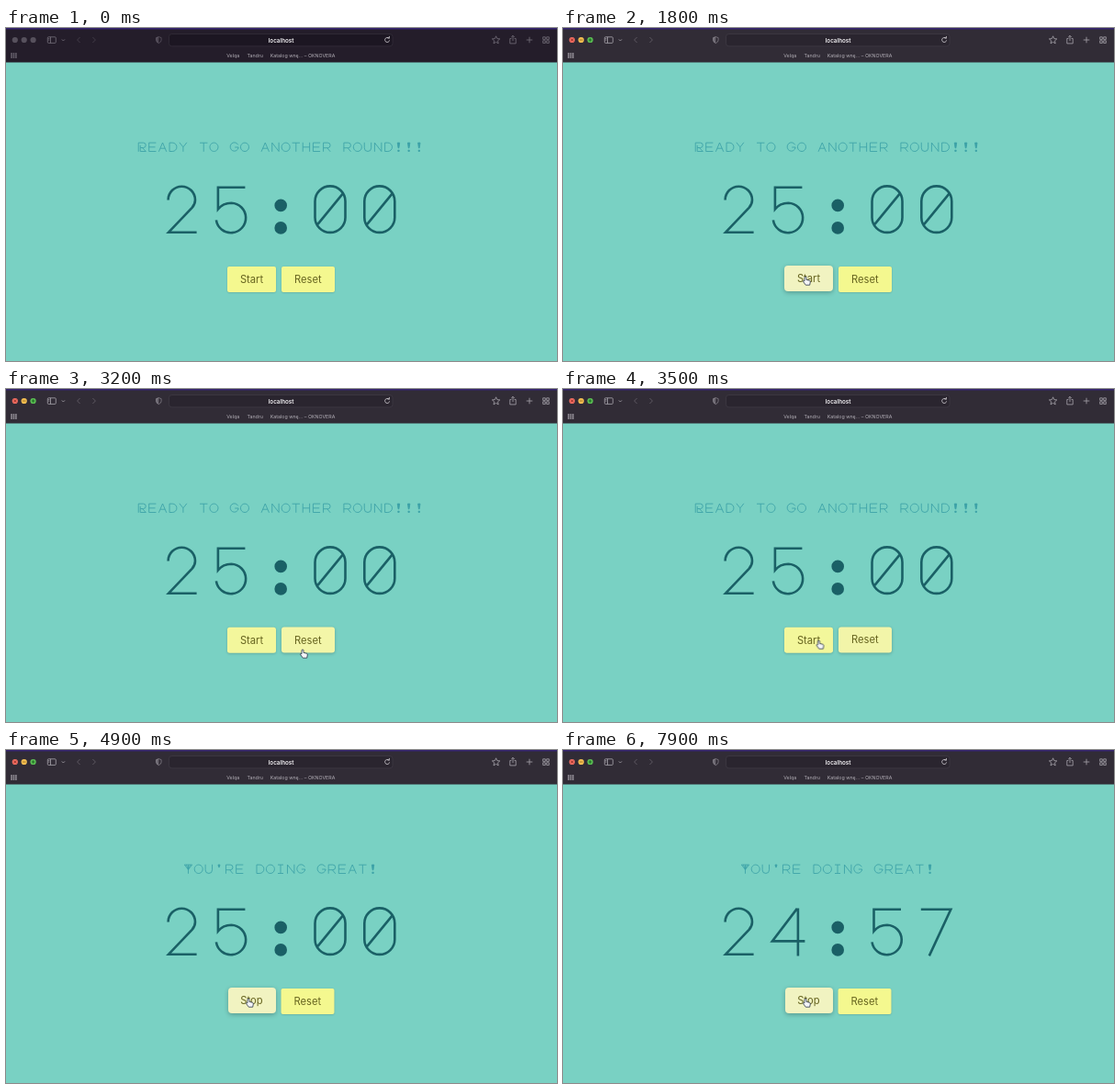
Animation of 600 by 363 pixels, one loop 8 s. Source, as an HTML page:

```html
<!DOCTYPE html>
<html lang="en">
<head>
<meta charset="utf-8">
<title>Focus timer</title>
<style>
  html, body { margin: 0; width: 100%; height: 100%; overflow: hidden; background: #79d1c3; }
  body { position: relative; font-family: Inter, "Liberation Sans", sans-serif; }
  svg { position: absolute; left: 0; top: 0; width: 600px; height: 363px; }
  .line { fill: none; stroke: currentColor; }

  /* Everything shares one 8 s clock. */
  .anim { animation: 8s linear -20ms infinite; }
  .step { animation: 8s step-end -20ms infinite; }

  #bar { animation-name: wake; }
  #bar .back { fill: var(--back); }
  #bar .field { fill: var(--field); stroke: var(--edge); stroke-width: .6; }
  #lamps { animation-name: lamps; }
  @keyframes wake {
    0% { --back: #241d2a; --field: #1c1622; --edge: #3a3441; color: #77717d; }
    5%, 100% { --back: #312c36; --field: #2a252f; --edge: #45404a; color: #aaa6ae; }
  }
  @keyframes lamps { 0% { opacity: 0; } 5%, 100% { opacity: 1; } }

  .title { color: #3ca1a7; stroke-width: .85; }
  .timer { color: #1a6066; stroke-width: 2.6; }
  .before { animation-name: before; }
  .after { animation-name: after; }
  @keyframes before { 0% { opacity: 1; } 52.5%, 100% { opacity: 0; } }
  @keyframes after { 0% { opacity: 0; } 52.5%, 100% { opacity: 1; } }
  #t0 { animation-name: t0; }
  #t1 { animation-name: t1; }
  #t2 { animation-name: t2; }
  #t3 { animation-name: t3; }
  @keyframes t0 { 0% { opacity: 1; } 65%, 100% { opacity: 0; } }
  @keyframes t1 { 0% { opacity: 0; } 65% { opacity: 1; } 77.5%, 100% { opacity: 0; } }
  @keyframes t2 { 0% { opacity: 0; } 77.5% { opacity: 1; } 90%, 100% { opacity: 0; } }
  @keyframes t3 { 0% { opacity: 0; } 90%, 100% { opacity: 1; } }

  .slot { position: absolute; left: 0; top: 260px; }
  .button {
    position: absolute; top: 0; height: 28px; line-height: 28px;
    text-align: center; font-size: 11.2px; color: #66641f; white-space: nowrap;
    background: #f4f88f; border-radius: 2px; box-shadow: 0 .5px 2px #0003;
  }
  #start { left: 241px; width: 53px; animation-name: start; }
  #stop { left: 241.5px; width: 52px; animation-name: stop; }
  #reset { left: 300px; width: 57.5px; animation-name: reset; }
  #resetSlot { animation-name: nudge; }
  @keyframes nudge { 0% { transform: none; } 52.5%, 100% { transform: translateX(-.5px); } }
  @keyframes start {
    0%, 8.75%, 41.25%, 43.1% { background: #f4f88f; transform: none; border-radius: 2px; box-shadow: 0 .5px 2px #0003; }
    12.5%, 37.5%, 46.9%, 100% { background: #f1f3c1; transform: translateY(-1px); border-radius: 4px; box-shadow: 0 1.5px 5px #0004; }
  }
  @keyframes stop {
    0%, 51.3% { background: #f4f88f; transform: none; border-radius: 2px; box-shadow: 0 .5px 2px #0003; }
    55.6%, 100% { background: #f1f3c1; transform: translateY(-1px); border-radius: 4px; box-shadow: 0 1.5px 5px #0004; }
  }
  @keyframes reset {
    0%, 38.4%, 46%, 100% { background: #f4f88f; transform: none; border-radius: 2px; box-shadow: 0 .5px 2px #0003; }
    42.2% { background: #f1f3c1; transform: translateY(-1px); border-radius: 4px; box-shadow: 0 1.5px 5px #0004; }
  }

  #pointer { animation-name: travel; }
  #arrow { animation-name: arrow; }
  #hand { animation-name: hand; }
  @keyframes travel {
    0%, 2.4% { transform: translate(252px, 311.5px); }
    2.5%, 5% { transform: translate(257px, 311.5px); }
    8.75% { transform: translate(262px, 286px); }
    12.5%, 35% { transform: translate(264px, 271px); }
    37.5% { transform: translate(292px, 276px); }
    40%, 41.25% { transform: translate(323px, 284px); }
    43.1% { transform: translate(292px, 277px); }
    45%, 100% { transform: translate(264px, 271px); }
  }
  @keyframes arrow { 0% { opacity: 0; } 1.25% { opacity: 1; } 8.75%, 100% { opacity: 0; } }
  @keyframes hand { 0% { opacity: 0; } 8.75%, 100% { opacity: 1; } }
</style>
</head>
<body>
<svg viewBox="0 0 600 363">
  <g id="bar" class="step">
    <rect class="back" width="600" height="37.5"/>
    <rect width="600" height="1.5" fill="#35246f"/>
    <g fill="#57515d"><circle cx="9.8" cy="13" r="3.1"/><circle cx="19.7" cy="13" r="3.1"/><circle cx="29.6" cy="13" r="3.1"/></g>
    <g id="lamps" class="step">
      <circle cx="9.8" cy="13" r="3.1" fill="#ed6a5e"/>
      <circle cx="19.7" cy="13" r="3.1" fill="#f4be4f"/>
      <circle cx="29.6" cy="13" r="3.1" fill="#58bd50"/>
      <g fill="none" stroke-width=".8">
        <path d="M8.5 11.7l2.6 2.6m0-2.6l-2.6 2.6" stroke="#8c2a22"/>
        <path d="M17.9 13h3.6" stroke="#93681c"/>
        <path d="M27.9 13h3.4m-1.7-1.7v3.4" stroke="#17601f"/>
      </g>
    </g>
    <rect class="field" x="177.5" y="6.5" width="243.5" height="13.3" rx="3"/>
    <g class="line" stroke-width=".8">
      <path d="M46.3 9.8h7a1 1 0 0 1 1 1v4.6a1 1 0 0 1-1 1h-7a1 1 0 0 1-1-1v-4.6a1 1 0 0 1 1-1zM48.5 9.8v6.6M46.2 11.6h1.2m-1.2 1.5h1.2"/>
      <path d="M60.8 12.4l1.6 1.6 1.6-1.6"/>
      <path d="M80.6 10l-3 3 3 3M94.4 10l3 3-3 3" opacity=".45"/>
      <path d="M166.3 9.6l2.8 1v2.6q0 2.2-2.8 3.4q-2.8-1.2-2.8-3.4v-2.6z" opacity=".65"/>
      <path d="M166.3 9.6l-2.8 1v2.6q0 2.2 2.8 3.4z" fill="currentColor" stroke="none" opacity=".5"/>
      <path d="M417.3 11.7a2.5 2.5 0 1 0 .3 1.7M415 10.8h2.4V8.9" stroke="#d8d5da"/>
      <path d="M533.6 8.8l1.2 2.8 3 .3-2.3 2 .7 3-2.6-1.6-2.6 1.6.7-3-2.3-2 3-.3z"/>
      <path d="M550.4 11.5h-1.6v5.4h6.4v-5.4h-1.6M552 14.2V8.3m-1.8 1.8l1.8-1.8 1.8 1.8"/>
      <path d="M566.7 13h6.6M570 9.7v6.6"/>
      <path d="M584.7 9.8h2.6v2.6h-2.6zm4 0h2.6v2.6h-2.6zm0 4h2.6v2.6h-2.6zm-4 0h2.6v2.6h-2.6z"/>
      <path d="M5.3 28h6.4M5.3 30h6.4M5.3 32h6.4" stroke-width="1.3" stroke-dasharray="1.6 .8"/>
    </g>
    <text x="299.6" y="15.5" fill="#f3f1f4" font-size="6.3" font-weight="600" text-anchor="middle">localhost</text>
    <g fill="#b3afb7" font-size="5.3" text-anchor="middle">
      <text x="247.2" y="31.7">Velqa</text>
      <text x="271.2" y="31.7">Tandru</text>
      <text x="323" y="31.7">Katalog wnę... – OKNOVERA</text>
    </g>
  </g>
  <g id="page"></g>
</svg>

<div class="slot step before"><div id="start" class="button anim">Start</div></div>
<div class="slot step after"><div id="stop" class="button anim">Stop</div></div>
<div id="resetSlot" class="slot step"><div id="reset" class="button anim">Reset</div></div>

<svg viewBox="0 0 600 363">
  <g id="pointer" class="anim" stroke-linejoin="round">
    <path id="arrow" class="step" d="M0 0V7.8L1.8 6.2L3 8.8L4.2 8.3L3.1 5.7H5.5Z" fill="#111" stroke="#fff" stroke-width=".6"/>
    <path id="hand" class="step" d="M-1 1a1 1 0 0 1 2 0v2.4l3.3.8q1.2.4 1 1.7l-.6 3.3h-4.4l-2.8-3.8q-.3-1.2 1.5-.6z" fill="#f4f5f8" stroke="#273044" stroke-width=".8"/>
  </g>
</svg>

<script>
  // Stroke glyphs: capitals are the ornate forms, lowercase the plain ones.
  const letters = {
    R: 'M.5 10V.3H5.8A2.7 2.7 0 0 1 5.8 5.7H2.5M2.5 3V9.7H8.6L4.6 5.7',
    Y: 'M.3 .3H8.7L4.5 5.5ZM2.4 .3L4.5 5.5L6.6 .3M4.5 .3V10',
    a: 'M.3 10L4.5 .2L8.7 10M2 6.4H7',
    d: 'M.8 .3H4A4.7 4.7 0 0 1 4 9.7H.8Z',
    e: 'M8.5 .3H.8V9.7H8.5M.8 5H7.6',
    g: 'M8.4 2.5A4.5 4.7 0 1 0 8.9 5.2H5',
    h: 'M.8 0V10M8.2 0V10M.8 5H8.2',
    i: 'M1.5 .3H7.5M4.5 .3V9.7M1.5 9.7H7.5',
    n: 'M.8 10V.3L8.2 9.7V0',
    o: 'M4.5 .3A4.5 4.7 0 1 0 4.6 .3Z',
    r: 'M.8 10V.3H5.5A2.8 2.8 0 0 1 5.5 5.9H.8M5 5.9L8.4 10',
    t: 'M.3 .4H8.7M4.5 .4V10',
    u: 'M.8 0V6A3.7 3.7 0 0 0 8.2 6V0',
    y: 'M.5 0L4.5 5L8.5 0M4.5 5V10',
    "'": 'M3.5 .3H5.5L4.8 3H4.2Z',
    '!': 'M3.3 .3H5.7L4.9 6H4.1ZM3.8 8.4H5.2V9.6H3.8Z'
  };
  // Digits are centred on x = 0.
  const digits = {
    0: 'M-16.5 16.5A16.5 16.5 0 0 1 16.5 16.5V34A16.5 16.5 0 0 1 -16.5 34ZM-13.5 41.5L13.5 8.5',
    2: 'M-15 15A14.7 14.7 0 0 1 14.4 15Q14.4 19.5 11 23.5L-14.5 50.3H16',
    4: 'M9.5 .5L-17.5 36H18M10.5 0V52',
    5: 'M15 1.3H-14.5V25Q-9 18.4 0 18.4A16.2 16.2 0 1 1 -16.5 37',
    7: 'M-17 1.3H15.5L-8 52',
    8: 'M0 .7A11.7 11.7 0 1 0 .1 .7ZM0 24A13.8 13.8 0 1 0 .1 24ZM0 24',
    9: 'M0 .7A15.8 15.8 0 1 0 .1 .7ZM14 24L-5 52',
    ':': 'M0 21V21.01M0 45.5V45.51'
  };

  const page = document.getElementById('page');
  const add = (parent, tag, attrs) => {
    const node = document.createElementNS('http://www.w3.org/2000/svg', tag);
    for (const key in attrs) node.setAttribute(key, attrs[key]);
    return parent.appendChild(node);
  };

  function title(text, phase) {
    const pitch = 11.17, left = 299 - text.length * pitch / 2 + 1.1;
    const group = add(page, 'g', { class: `title line step ${phase}`, role: 'img', 'aria-label': text });
    [...text].forEach((char, i) => {
      if (char === ' ') return;
      add(group, 'path', {
        d: letters[char],
        transform: `translate(${left + i * pitch} 124.8)`,
        fill: /['!]/.test(char) ? 'currentColor' : 'none'
      });
    });
  }

  function timer(text, i) {
    const group = add(page, 'g', { id: 't' + i, class: 'timer line step', role: 'img', 'aria-label': text });
    [...text].forEach((char, k) => add(group, 'path', {
      d: digits[char],
      transform: `translate(${299.2 + (k - 2) * 53.8} 172.4)`,
      ...(char === ':' && { 'stroke-width': 13.6, 'stroke-linecap': 'round' })
    }));
  }

  title('Ready to go another round!!!', 'before');
  title("You're doing great!", 'after');
  ['25:00', '24:59', '24:58', '24:57'].forEach(timer);
</script>
</body>
</html>
```
